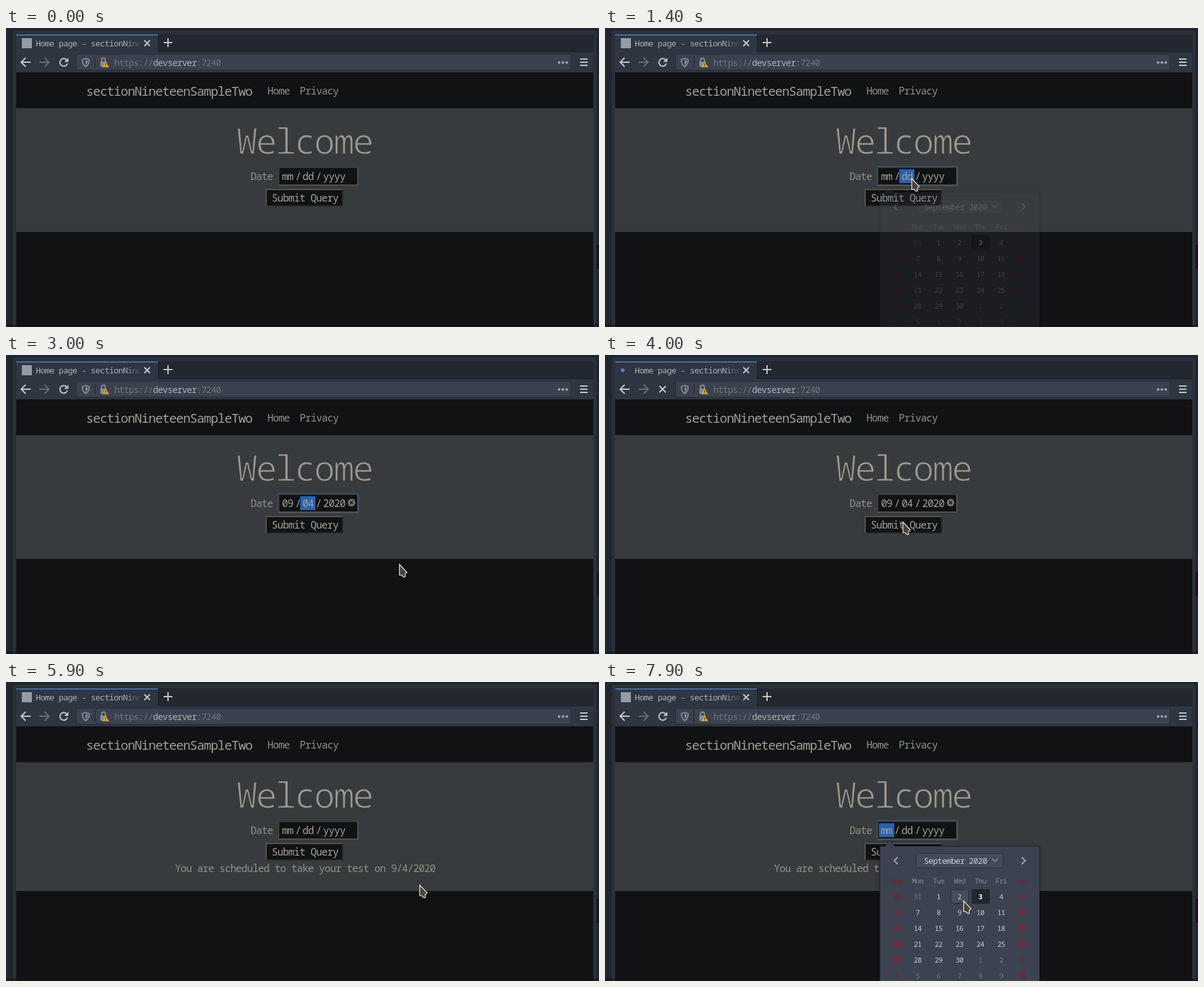
Animation of 937 by 472 pixels, one loop 8000 ms. Source, as an HTML page:

```html
<!DOCTYPE html>
<html lang="en">
<head>
<meta charset="utf-8">
<title>Date form</title>
<style>
html, body { margin: 0; width: 100%; height: 100%; overflow: hidden; background: #21252e; }
svg { display: block; width: 937px; height: 472px; }
text {
  font-family: "Noto Sans Mono", "DejaVu Sans Mono", monospace;
  font-weight: 300; font-size: 16px; letter-spacing: -.053em; white-space: pre;
}
.line { fill: none; stroke: #c6c9cf; stroke-width: 2; }
.body { fill: #948f87; }
.field { fill: #a5a199; }
/* An outline in the page colour thins the heavy strokes. */
.heading { font-size: 56px; fill: #9b978e; stroke: #373b3d; stroke-width: 1.5px; }
.small text { font-size: 11px; text-anchor: middle; fill: #cbced4; }
.small .name { fill: #858b97; }
.small .other { fill: #747a87; }
.small .end { fill: #b3101c; font-weight: 700; }
.small .end.name, .small .end.other { fill: #7f202b; }
.small .today { fill: #fff; font-weight: 700; }
.cell { fill: #454c5b; stroke: #23272f; }
.panel { filter: drop-shadow(0 1px 3px rgba(0, 0, 0, .35)); }

/* Every part shares one 8 s clock. */
.t { animation: 8s step-end infinite; }
.focus { animation-name: focus; }
.pickDay { animation-name: pickDay; }
.pickMonth { animation-name: pickMonth; }
.empty { animation-name: empty; }
.filled { animation-name: filled; }
.sent { animation-name: sent; }
.busy { animation-name: busy; }
.idle { animation-name: idle; }
.reload { animation-name: reload; }
.popup { animation-name: popup; }
.title { animation-name: title; }
.hover4 { animation-name: hover4; }
.hover2 { animation-name: hover2; }
.beam { animation-name: beam; }
.arrow { animation-name: arrow; }
.mouse { animation-name: mouse; }
.dot { animation: dot .4s ease-in-out infinite alternate; }

@keyframes focus { 0%, 47.5% { opacity: 0 } 16.25%, 86.25%, 100% { opacity: 1 } }
@keyframes pickDay { 0%, 47.5%, 100% { opacity: 0 } 16.25% { opacity: 1 } }
@keyframes pickMonth { 0% { opacity: 0 } 86.25%, 100% { opacity: 1 } }
@keyframes empty { 0%, 52.5%, 100% { opacity: 1 } 36.25% { opacity: 0 } }
@keyframes filled { 0%, 52.5%, 100% { opacity: 0 } 36.25% { opacity: 1 } }
@keyframes sent { 0% { opacity: 0 } 52.5%, 100% { opacity: 1 } }
@keyframes busy { 0%, 57.5%, 100% { opacity: 0 } 47.5% { opacity: 1 } }
@keyframes idle { 0%, 57.5%, 100% { opacity: 1 } 47.5% { opacity: 0 } }
@keyframes reload { 0%, 60%, 100% { opacity: 1 } 47.5% { opacity: 0 } 57.5% { opacity: .4 } }
@keyframes popup {
  0%, 37.5% { opacity: 0 }
  17.5%, 87.5% { opacity: .25 }
  36.25% { opacity: .4 }
  18.75%, 88.75%, 100% { opacity: 1 }
}
@keyframes title {
  0%, 26.25%, 96.25%, 100% { fill: #cdd0d6 }
  25%, 95% { fill: #292d36 }
}
@keyframes hover4 { 0%, 37.5%, 100% { opacity: 0 } 27.5% { opacity: 1 } }
@keyframes hover2 { 0% { opacity: 0 } 98.75%, 100% { opacity: 1 } }
@keyframes beam { 0%, 11.25%, 100% { opacity: 0 } 8.75% { opacity: 1 } }
@keyframes arrow { 0%, 11.25%, 100% { opacity: 1 } 8.75% { opacity: 0 } }
@keyframes dot { from { transform: translateX(-5px) } to { transform: translateX(5px) } }
@keyframes mouse {
  0% { transform: translate(92px, -30px) }
  3.75% { transform: translate(92px, 26px); animation-timing-function: steps(4) }
  8.75% { transform: translate(434px, 208px) }
  10% { transform: translate(434px, 208px); animation-timing-function: steps(3) }
  13.75% { transform: translate(485px, 237px) }
  21.25% { transform: translate(485px, 237px); animation-timing-function: steps(3) }
  25% { transform: translate(541px, 292px); animation-timing-function: steps(2) }
  27.5% { transform: translate(627px, 329px) }
  32.5% { transform: translate(622px, 330px) }
  38.75% { transform: translate(622px, 330px); animation-timing-function: steps(5) }
  45% { transform: translate(471px, 263px) }
  58.75% { transform: translate(471px, 263px); animation-timing-function: steps(2) }
  61.25% { transform: translate(444px, 296px); animation-timing-function: steps(7) }
  70% { transform: translate(516px, 327px); animation-timing-function: steps(3) }
  73.75% { transform: translate(654px, 320px) }
  77.5% { transform: translate(654px, 320px); animation-timing-function: steps(6) }
  85% { transform: translate(458px, 229px) }
  90% { transform: translate(458px, 229px); animation-timing-function: steps(3) }
  93.75% { transform: translate(462px, 281px) }
  95% { transform: translate(500px, 288px); animation-timing-function: steps(3) }
  98.75%, 100% { transform: translate(567px, 345px) }
}
</style>
</head>
<body>
<svg viewBox="0 0 937 472">
  <defs>
    <linearGradient id="fade">
      <stop stop-color="#2f3541" stop-opacity="0"/>
      <stop offset="1" stop-color="#2f3541"/>
    </linearGradient>
  </defs>

  <!-- Window frame -->
  <rect width="937" height="472" fill="#21252e"/>
  <path d="M933 342h4v38h-4z" fill="#14161c"/>
  <rect x="11" y="4" width="922" height="480" rx="4" fill="#2b303c"/>
  <path d="M16 10H928V38H16z" fill="#23272f"/>
  <path d="M16 38H928V70H16z" fill="#2f3541"/>
  <path d="M240 37.5H928" stroke="#1b1e25"/>

  <!-- Tab -->
  <path d="M16 10H240V38H16z" fill="#2f3541"/>
  <path d="M16 10H240V12H16z" fill="#3f70a5"/>
  <path d="M240.500 12V38" stroke="#1b1e25"/>
  <rect class="t idle" x="25" y="16" width="16" height="16" fill="#929ca5"/>
  <g class="t busy"><circle class="dot" cx="33" cy="24" r="3" fill="#4a86c5"/></g>
  <text x="47" y="28.500" style="font-size:13.250px" fill="#adb1b9">Home page - sectionNine</text>
  <rect x="188" y="14" width="27" height="20" fill="url(#fade)"/>
  <path class="line" d="M218.500 19.500l9 9m0-9l-9 9M249 23h14m-7-7v14"/>

  <!-- Toolbar -->
  <path class="line" d="M39 54H24m7-7l-7 7 7 7"/>
  <path class="line" d="M53 54h15m-7-7l7 7-7 7" opacity=".38"/>
  <g class="t reload">
    <path class="line" d="M97 56A6 6 0 1 1 95.500 50"/>
    <path d="M98.500 47v6.500H92z" fill="#c6c9cf"/>
  </g>
  <path class="line t busy" d="M86 49l10 10m0-10l-10 10"/>
  <rect x="111.500" y="41.500" width="781" height="25" rx="3" fill="#3b414e" stroke="#292e38"/>
  <path class="line" style="stroke:#8f959f;stroke-width:1.600" d="M126 48l5.500 2c0 5-1.500 8.500-5.500 11-4-2.500-5.500-6-5.500-11z"/>
  <path d="M126 50.500l3 1c0 3-1 5-3 7z" fill="#8f959f"/>
  <path d="M140.500 45V63" stroke="#20242c"/>
  <path d="M149 53h10v8h-10z" fill="#858b96"/>
  <path class="line" style="stroke:#858b96" d="M151 53v-2.500a3 3 0 0 1 6 0V53"/>
  <path d="M157.500 53l5.500 9h-11z" fill="#d9a520"/>
  <path d="M157.500 56v3m0 1v1" stroke="#3a3420"/>
  <text x="171" y="60" style="font-size:14px" fill="#6f7581">https://<tspan fill="#adb1b9">devserver</tspan>:7240</text>
  <g fill="#a4a9b2"><circle cx="874" cy="54.500" r="2"/><circle cx="880" cy="54.500" r="2"/><circle cx="886" cy="54.500" r="2"/></g>
  <path class="line" d="M907 49h12m-12 5h12m-12 5h12"/>

  <!-- Page -->
  <path d="M16 70H928V472H16z" fill="#111214"/>
  <path d="M16 126.500H928" stroke="#25282a"/>
  <path d="M16 127H928V322H16z" fill="#373b3d"/>
  <path class="t sent" d="M16 321H928V330H16z" fill="#373b3d"/>
  <text x="126.500" y="107" style="font-size:20px" fill="#a29e96">sectionNineteenSampleTwo</text>
  <text class="body" x="413" y="105">Home</text>
  <text class="body" x="464" y="105">Privacy</text>
  <text class="heading" x="364" y="199">Welcome</text>
  <text class="body" x="386.500" y="240">Date</text>

  <!-- Date field -->
  <path d="M430 219H557V249H430z" fill="#55504a"/>
  <path d="M430 249V219H557L555 221H432V247z" fill="#3f3b36"/>
  <path d="M432 221H555V247H432z" fill="#111214"/>
  <g class="t focus">
    <rect x="429.500" y="218.500" width="128" height="31" rx="2.500" fill="none" stroke="#36516f"/>
    <path d="M431 218.500H556" stroke="#2b5f9f"/>
  </g>
  <path class="t pickDay" d="M465 223H489V245H465z" fill="#2a62ad"/>
  <path class="t pickMonth" d="M433 223H457V245H433z" fill="#2a62ad"/>
  <g class="field">
    <text x="457" y="240">/</text>
    <text x="489.500" y="240">/</text>
    <g class="t empty">
      <text x="436" y="240">mm</text><text x="468.500" y="240">dd</text><text x="501" y="240">yyyy</text>
    </g>
    <g class="t filled">
      <text x="436" y="240">09</text><text x="468.500" y="240">04</text><text x="501" y="240">2020</text>
      <circle cx="546" cy="233" r="6" fill="#737373"/>
      <path d="M543.500 230.500l5 5m0-5l-5 5" stroke="#111214" stroke-width="1.500"/>
    </g>
  </g>

  <!-- Button and reply -->
  <path d="M410 254H533V282H410z" fill="#2d2c2b"/>
  <path d="M410 282V254H533L531 256H412V280z" fill="#57534b"/>
  <path d="M412 256H531V280H412z" fill="#111214"/>
  <text class="field" x="420" y="274">Submit Query</text>
  <text class="body t sent" x="267" y="300">You are scheduled to take your test on 9/4/2020</text>

  <path d="M0 468H937V472H0z" fill="#131418" opacity=".5"/>

  <!-- Calendar -->
  <g class="t popup">
    <path class="panel" d="M434.500 480V259.500H442L450 250.500 458 259.500H686.500V480z" fill="#3c4250" stroke="#272b34"/>
    <path class="line" style="stroke:#a0a5af" d="M462.500 276.500l-5.500 5.500 5.500 5.500M658.500 276.500l5.500 5.500-5.500 5.500"/>
    <rect x="491.500" y="270.500" width="138" height="23" rx="2" fill="#434a59" stroke="#262a33"/>
    <text class="t title" x="504" y="287" style="font-size:13px">September 2020</text>
    <path class="line" style="stroke:#9399a4;stroke-width:1.500" d="M611.500 279l4.500 4.500 4.500-4.500"/>
    <rect x="579" y="327" width="29" height="23" rx="2" fill="#23262e"/>
    <rect class="cell t hover4" x="612.500" y="327.500" width="28" height="22" rx="2"/>
    <rect class="cell t hover2" x="546.500" y="327.500" width="28" height="22" rx="2"/>
    <g class="small" id="days"></g>
  </g>

  <!-- Pointer -->
  <g class="t mouse">
    <path class="t arrow" d="M-.300 .500V17.500H3.500L6 20.500H8.500V15.500L11.500 13z" fill="#47443f" stroke="#eceae6" stroke-width="1.200"/>
    <path class="t beam" d="M-3-9h6m-3 0V9m-3 0h6" fill="none" stroke="#eceae6" stroke-width="1.300"/>
  </g>
</svg>
<script>
const days = document.getElementById('days');

function label(col, y, str, kind) {
  const el = document.createElementNS('http://www.w3.org/2000/svg', 'text');
  el.setAttribute('x', 461 + col * 33);
  el.setAttribute('y', y);
  el.setAttribute('class', kind + (col % 6 ? '' : ' end'));
  el.textContent = str;
  days.append(el);
}

['Sun', 'Mon', 'Tue', 'Wed', 'Thu', 'Fri', 'Sat'].forEach((name, col) => label(col, 318, name, 'name'));

for (let i = 0; i < 42; i++) {
  const date = new Date(2020, 7, 30 + i);
  const day = date.getDate();
  const inMonth = date.getMonth() === 8;
  label(i % 7, 343 + Math.floor(i / 7) * 25, day, !inMonth ? 'other' : day === 3 ? 'today' : '');
}
</script>
</body>
</html>
```
